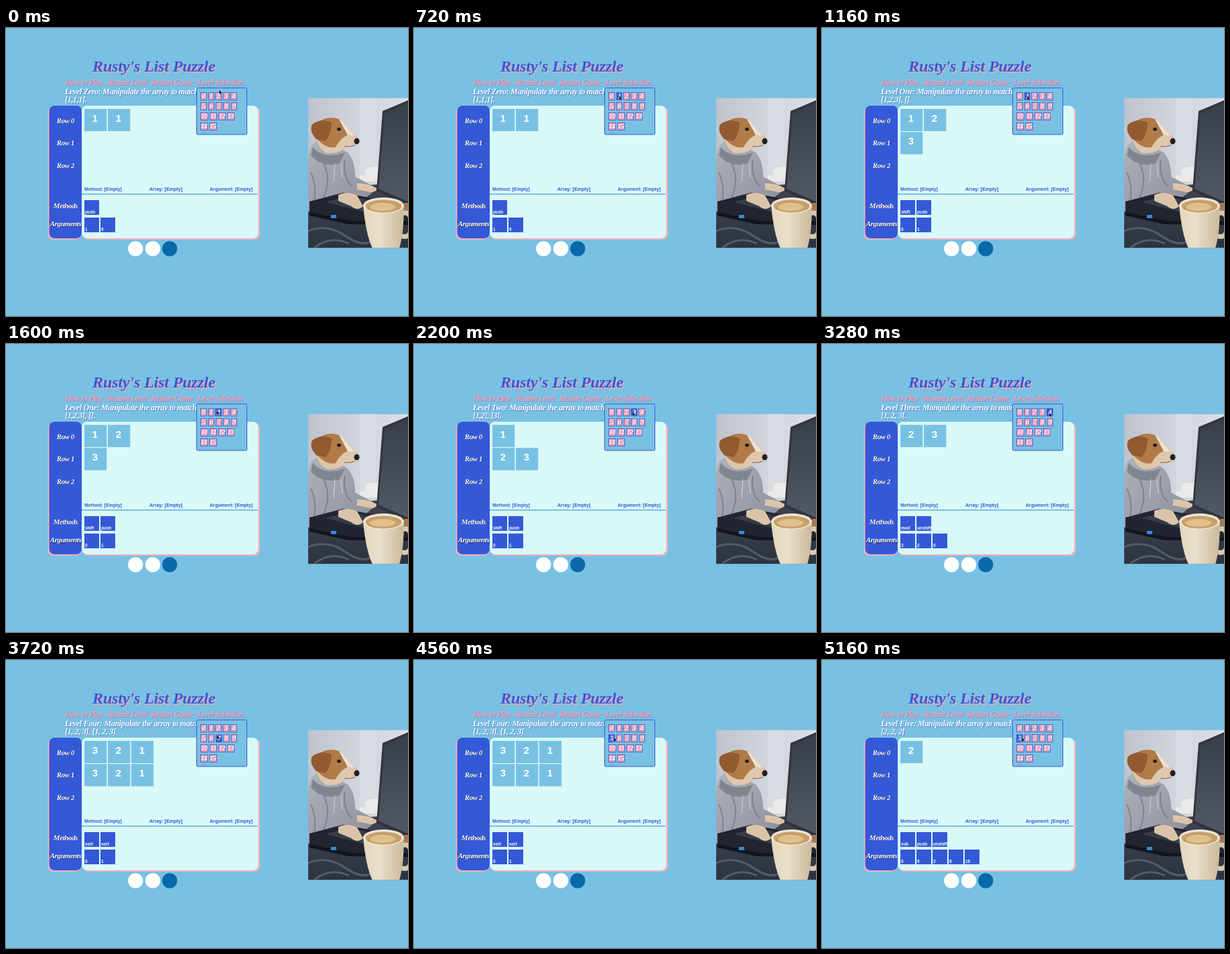
An HTML page that plays this animation: 600 by 430 pixels, repeating every 5.2 s.

```html
<!DOCTYPE html>
<html lang="en">
<head>
<meta charset="utf-8">
<title>Rusty's List Puzzle</title>
<style>
  html, body { margin: 0; width: 100%; height: 100%; overflow: hidden; background: #78c1e3; }
  svg { display: block; }
  .script { font: italic bold 12px "Liberation Serif", "Noto Serif", serif; letter-spacing: -.3px; }
  .title { font-size: 24px; letter-spacing: -.1px; }
  .nav { letter-spacing: -.45px; }
  .side { font-size: 11px; letter-spacing: -.4px; }
  .num { font-size: 10px; letter-spacing: -.4px; }
  .sans { font: bold 7.1px "Liberation Sans", Arial, sans-serif; }
  .value { font-size: 15px; }
  .code { font-size: 6.3px; }
</style>
</head>
<body>
<svg id="stage" width="600" height="430" viewBox="0 0 600 430">
  <defs>
    <linearGradient id="wall">
      <stop offset="0" stop-color="#bfc4ce"/>
      <stop offset=".45" stop-color="#cfd3db"/>
      <stop offset="1" stop-color="#dcdfe4"/>
    </linearGradient>
    <linearGradient id="mug">
      <stop offset="0" stop-color="#e2d5bd"/>
      <stop offset=".4" stop-color="#eadfca"/>
      <stop offset="1" stop-color="#c9b99c"/>
    </linearGradient>
    <linearGradient id="hoodie" x2="1" y2="1">
      <stop offset="0" stop-color="#adb1ba"/>
      <stop offset="1" stop-color="#8b909b"/>
    </linearGradient>
    <linearGradient id="lid" x2="0" y2="1">
      <stop offset="0" stop-color="#383e4a"/>
      <stop offset="1" stop-color="#525965"/>
    </linearGradient>
    <linearGradient id="table" x2="0" y2="1">
      <stop offset="0" stop-color="#3f4551"/>
      <stop offset="1" stop-color="#2c323f"/>
    </linearGradient>
    <clipPath id="crop"><rect x="451" y="104.700" width="149" height="223.500"/></clipPath>
  </defs>
  <rect width="600" height="430" fill="#78c1e3"/>

  <g id="photo" clip-path="url(#crop)">
    <rect x="451" y="104" width="149" height="225" fill="url(#wall)"/>
    <path d="M528 104h24v117h-24z" fill="#d9dce2"/>
    <path d="M536 211q11-6 23-3v14h-23zM528 220h32v9h-32z" fill="#eceae8"/>
    <path d="M451 262L520 236 600 230V329H451z" fill="url(#table)"/>
    <path d="M451 303Q480 292 506 310T545 318M460 328Q484 309 512 322" fill="none" stroke="#535b69" stroke-width="3"/>
    <path d="M453 182Q458 163 488 172L510 186Q521 198 521 222L546 235 550 243 530 259 500 250 480 268 451 274V192z" fill="url(#hoodie)"/>
    <path d="M458 178Q474 197 506 186L497 203Q470 208 455 190z" fill="#7f858f"/>
    <path d="M474 202Q486 226 474 254M506 197Q502 222 516 236M455 216Q464 235 460 258" fill="none" stroke="#7e8490" stroke-width="2"/>
    <path d="M491 202l-2 28M500 202l2 22" stroke="#d3d5da"/>
    <path d="M463 158Q466 134 488 134 502 135 509 148L526 164Q529 172 521 175L507 178Q498 188 480 187 464 181 463 158z" fill="#dfc7ae"/>
    <path d="M459 155Q464 134 486 134 501 134 508 147L513 159Q500 162 492 178 478 181 464 166z" fill="#b27b48"/>
    <path d="M486 141Q471 134 457 144 452 154 463 166L477 169Q486 159 486 141z" fill="#915a30"/>
    <path d="M497 136Q504 139 508 147L520 161 510 160z" fill="#eee1d4"/>
    <ellipse cx="497" cy="151" rx="3" ry="2.600" fill="#24201f"/>
    <ellipse cx="523.500" cy="169" rx="4" ry="4.500" fill="#211f22"/>
    <path d="M505 177Q515 178 521 175" fill="none" stroke="#765c50"/>
    <path d="M562 124L600 108V268L553 243z" fill="#30353f"/>
    <path d="M565 127L600 112V259L556 240z" fill="url(#lid)"/>
    <path d="M453 259L503 246 600 264V290L515 289 453 276z" fill="#20252f"/>
    <path d="M477 260L511 250 560 261 536 275z" fill="#353c48"/>
    <path d="M453 275L515 288 600 289V294L511 293 453 280z" fill="#11151d"/>
    <path d="M496 249Q510 243 524 250L533 266Q525 274 515 266L496 258z" fill="#dcc4aa"/>
    <path d="M524 232Q540 231 553 239 554 245 544 245L524 241z" fill="#dcc4aa"/>
    <rect x="485" y="279" width="8" height="5" fill="#3488d7"/>
    <path d="M594 261h6v14h-6z" fill="#a77850"/>
    <path d="M588 278Q605 270 605 294T586 309" fill="none" stroke="#d8cab2" stroke-width="7"/>
    <path d="M533 265Q537 308 547 329H587Q594 306 594 265z" fill="url(#mug)"/>
    <ellipse cx="563.500" cy="265" rx="30.500" ry="12" fill="#eee5d5"/>
    <ellipse cx="563.500" cy="266" rx="27" ry="9.500" fill="#c99f69"/>
    <ellipse cx="562" cy="267" rx="19" ry="6" fill="#e0c08d"/>
  </g>

  <g id="panel">
    <rect x="62.500" y="118" width="50" height="198" rx="8" fill="#f5aebb"/>
    <rect x="115" y="118" width="264" height="198" rx="8" fill="#f5aebb"/>
    <rect x="64.500" y="116" width="48.500" height="198" rx="8" fill="#3459d7"/>
    <rect x="113" y="116" width="263.500" height="198" rx="8" fill="#d9f9f8"/>
    <rect x="113" y="247" width="263" height="2" fill="#78c1e3"/>
  </g>
  <circle cx="193.300" cy="329.500" r="11.200" fill="#fff"/>
  <circle cx="219" cy="329.500" r="11.200" fill="#fff"/>
  <circle cx="244.300" cy="329.500" r="11.200" fill="#0a69a8"/>
  <g id="labels"></g>
  <g id="level"></g>
  <g id="menu">
    <rect x="284.500" y="89.500" width="75" height="69.500" rx="2" fill="#78c1e3" stroke="#3459d7"/>
  </g>
  <path id="cursor" d="M0 0V7.200L1.700 5.700 2.900 8.300 4.100 7.700 2.900 5.300H5.200z" fill="#111" stroke="#dce5f5" stroke-width=".5"/>
</svg>
<script>
const BLUE = '#3459d7', SKY = '#78c1e3', PINK = '#f5a3b6', LOOP = 5200;
const $ = id => document.getElementById(id);

function add(parent, tag, attrs, text) {
  const el = document.createElementNS('http://www.w3.org/2000/svg', tag);
  for (const key in attrs) el.setAttribute(key, attrs[key]);
  if (text !== undefined) el.textContent = text;
  parent.appendChild(el);
  return el;
}

function write(parent, text, x, y, cls, fill, anchor = 'start') {
  return add(parent, 'text', { x, y, class: cls, fill, 'text-anchor': anchor }, text);
}

function shadowed(parent, text, x, y, cls, fill, shade, anchor, offset = 1) {
  write(parent, text, x + offset, y + offset, cls, shade, anchor);
  write(parent, text, x, y, cls, fill, anchor);
}

function square(parent, x, y, size, fill) {
  return add(parent, 'rect', { x, y, width: size, height: size, fill });
}

const labels = $('labels');
shadowed(labels, "Rusty's List Puzzle", 129, 65, 'script title', BLUE, PINK, 'start', 1.5);
[['How to Play', 88], ['Restart Level', 151.5], ['Restart Game', 216.5], ['Level Selection', 285.5]]
  .forEach(([text, x]) => shadowed(labels, text, x, 85, 'script nav', PINK, '#8088c4', 'start', .8));
[['Row 0', 141.5], ['Row 1', 174.5], ['Row 2', 208.5], ['Methods', 268.5], ['Arguments', 296]]
  .forEach(([text, y]) => shadowed(labels, text, 89, y, 'script side', '#fff', '#172756', 'middle', .8));
[['Method', 117], ['Array', 214], ['Argument', 304]]
  .forEach(([text, x]) => write(labels, text + ': [Empty]', x, 243, 'sans', BLUE));

// Level buttons: left edge and width, row by row.
const buttonRows = [
  [[290, 10], [302, 8.5], [312, 10], [323.5, 10], [335, 10]],
  [[290, 10], [302, 9], [313, 9.5], [324, 9.5], [336, 9]],
  [[290, 12], [304, 11], [317, 11], [330, 11]],
  [[290, 11], [303, 12]]
];
const buttons = buttonRows.flatMap((row, r) => row.map(([x, w]) => ({ x, y: 96 + 15 * r, w, h: 12 })));
buttons.forEach((b, i) => {
  b.box = add($('menu'), 'rect', {
    x: b.x + .5, y: b.y + .5, width: b.w - 1, height: b.h - 1, fill: PINK, stroke: BLUE, 'stroke-width': .8
  });
  shadowed($('menu'), i, b.x + b.w / 2, b.y + 9, 'script num', '#fff', '#a878b4', 'middle', .6);
});

const levels = [
  { at: 0, name: 'Zero', goal: '[1,1,1].', rows: [[1, 1]], methods: ['push'], args: [1, 0] },
  { at: 1120, name: 'One', goal: '[1,2,3], [].', rows: [[1, 2], [3]], methods: ['shift', 'push'], args: [0, 1] },
  { at: 1880, name: 'Two', goal: '[1,2], [3].', rows: [[1], [2, 3]], methods: ['shift', 'push'], args: [0, 1] },
  { at: 2640, name: 'Three', goal: '[1, 2, 3].', rows: [[2, 3]], methods: ['mod', 'unshift'], args: [3, 2, 0] },
  { at: 3400, name: 'Four', goal: '[1, 2, 3], [1, 2, 3]', rows: [[3, 2, 1], [3, 2, 1]], methods: ['sort', 'sort'], args: [0, 1] },
  { at: 5040, name: 'Five', goal: '[2, 2, 2]', rows: [[2]], methods: ['sub', 'push', 'unshift'], args: [0, 0, 2, 8, 10] }
];

function drawLevel({ name, goal, rows, methods, args }) {
  const g = $('level');
  g.replaceChildren();
  shadowed(g, `Level ${name}: Manipulate the array to match`, 88, 99, 'script', '#fff', '#4d74c4', 'start', .8);
  shadowed(g, goal, 88, 111, 'script', '#fff', '#4d74c4', 'start', .8);
  rows.forEach((row, r) => row.forEach((value, c) => {
    const x = 117 + 35 * c, y = 120.7 + 34.5 * r;
    square(g, x, y, 33.3, SKY);
    write(g, value, x + 16, y + 19, 'sans value', '#fff', 'middle');
  }));
  [methods, args].forEach((list, r) => list.forEach((text, c) => {
    const x = 117 + 24 * c, y = 257 + 26 * r;
    square(g, x, y, 22, BLUE);
    write(g, text, x + 1, y + 19.8, 'sans code', '#fff');
  }));
}

// Pointer path: time, x, y.
const path = [
  [0, 318, 92], [240, 316, 93], [640, 306, 101], [1160, 306, 101],
  [1520, 314, 99], [1960, 315, 100], [2320, 329.5, 101], [2840, 329.5, 101],
  [3120, 339, 102], [3480, 339, 102], [3720, 314.5, 111.5], [4080, 298, 115], [LOOP, 298, 115]
];

function pointer(t) {
  const i = path.findIndex(p => p[0] > t);
  const [t0, x0, y0] = path[i - 1], [t1, x1, y1] = path[i];
  const u = (t - t0) / (t1 - t0), e = u * u * (3 - 2 * u);
  return [x0 + (x1 - x0) * e, y0 + (y1 - y0) * e];
}

let shown;
function render(now) {
  const t = Math.floor(now % LOOP / 40) * 40;
  const level = levels.findLast(l => l.at <= t);
  if (level !== shown) drawLevel(shown = level);
  const [x, y] = pointer(t);
  $('cursor').setAttribute('transform', `translate(${x} ${y})`);
  for (const b of buttons) {
    const over = x >= b.x && x <= b.x + b.w && y >= b.y && y <= b.y + b.h;
    b.box.setAttribute('fill', over ? BLUE : PINK);
  }
}

const start = performance.now();
function tick() {
  render(performance.now() - start);
  requestAnimationFrame(tick);
}
tick();
</script>
</body>
</html>
```
